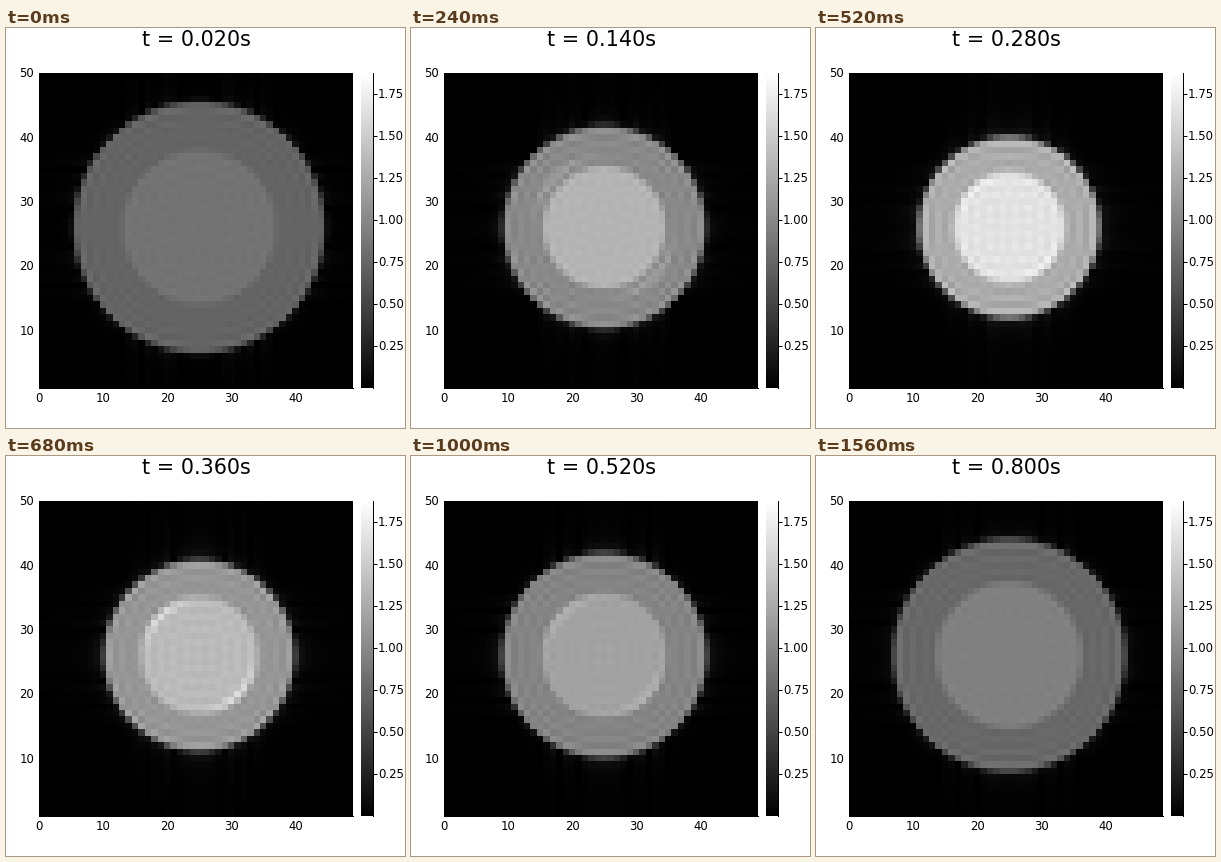
Recreate the animation shown at these times as a matplotlib script. Size 399x400 px, loop 1.6 s.

```python
import numpy as np
import matplotlib.pyplot as plt
from matplotlib.animation import FuncAnimation

W, H, DPI = 399, 400, 64
FRAMES, INTERVAL = 40, 40
N = 50
VMAX = 1.875

# Heart cycle: time, outer radius, inner radius, cavity and wall gray level
CYCLE = np.array([
    (0.02, 19.6, 11.9, 115, 100),
    (0.08, 17.5, 10.6, 143, 115),
    (0.14, 15.8, 9.5, 180, 137),
    (0.22, 14.1, 8.45, 247, 185),
    (0.26, 14.0, 8.5, 236, 177),
    (0.36, 14.9, 9.2, 186, 150),
    (0.52, 16.0, 9.7, 162, 132),
    (0.66, 17.0, 10.4, 143, 120),
    (0.80, 18.2, 11.3, 128, 104),
])

# Bessel J1 from its integral form
tau = (np.arange(256) + 0.5) * np.pi / 256
bx = np.linspace(0, 100, 4001)
j1 = np.cos(tau - bx[:, None] * np.sin(tau)).mean(axis=1)

freq = np.fft.fftfreq(N)
K = np.maximum(np.hypot(freq[:, None], freq[None, :]), 1e-9)

yy, xx = np.mgrid[:N, :N] - N // 2
DIST = np.hypot(xx, yy)
DIAGONAL = np.clip(-2 * xx * yy / np.maximum(DIST, 1) ** 2, 0, 1) ** 1.5


def disc(radius):
    """Fourier transform of a unit disc on the sampled grid."""
    spectrum = radius * np.interp(2 * np.pi * radius * K, bx, j1) / K
    spectrum[0, 0] = np.pi * radius ** 2
    return spectrum


def phantom(t):
    outer, inner, cavity, wall = (
        np.interp(t, CYCLE[:, 0], CYCLE[:, i]) for i in range(1, 5))
    spectrum = wall * disc(outer) + (cavity - wall) * disc(inner)
    img = np.abs(np.fft.fftshift(np.fft.ifft2(spectrum)))
    # motion leaves a bright rim along one diagonal
    contracting = np.interp(t, [0.04, 0.14, 0.21], [0, 24, 0])
    relaxing = np.interp(t, [0.25, 0.36, 0.52, 0.66, 0.8], [0, 32, 16, 5, 0])
    for gain, shift in ((contracting, 1.4), (relaxing, -0.6)):
        rim = np.exp(-((DIST - inner - shift) / 0.65) ** 2)
        img += gain * rim * DIAGONAL
    return img * VMAX / 255


def pixel_axes(x0, y0, x1, y1):
    return fig.add_axes([x0 / W, 1 - y1 / H, (x1 - x0) / W, (y1 - y0) / H])


def label(x, y, text, px, ha):
    return fig.text(x / W, 1 - y / H, text, fontsize=px * 72 / DPI,
                    ha=ha, va="baseline", color="black")


plt.rcParams["font.family"] = "DejaVu Sans"
fig = plt.figure(figsize=(W / DPI, H / DPI), dpi=DPI, facecolor="white")
LINE = 72 / DPI

ax = pixel_axes(33, 45, 347, 360)
image = ax.imshow(phantom(0.02), cmap="gray", vmin=0, vmax=VMAX,
                  origin="lower", interpolation="nearest", aspect="auto",
                  extent=(-0.5, N - 0.5, 0.5, N + 0.5))
ax.set(xlim=(0, 49), ylim=(1, 50), xticks=[], yticks=[])

bar = pixel_axes(355, 45, 367, 360)
bar.imshow(np.linspace(0, 1, 256)[:, None], cmap="gray", origin="lower",
           interpolation="nearest", aspect="auto", extent=(0, 1, 0, VMAX))
bar.set(xlim=(0, 1), ylim=(0, VMAX), xticks=[])
ticks = np.arange(0.25, 1.8, 0.25)
bar.yaxis.tick_right()
bar.set_yticks(ticks, labels=[])
bar.tick_params(axis="y", length=4 * LINE, width=LINE)

for axes, shown in ((ax, ("left", "bottom")), (bar, ("right",))):
    for side, spine in axes.spines.items():
        spine.set_visible(side in shown)
        spine.set_linewidth(LINE)

for v in range(0, 50, 10):
    label(33.3 + v * 314 / 49, 374.3, str(v), 11.6, "center")
for v in range(10, 60, 10):
    label(28.3, 360 - (v - 1) * 315 / 49 + 4.4, str(v), 11.6, "right")
for v in ticks:
    label(371.8, 360 - v * 315 / VMAX + 4.4, f"{v:.2f}", 11.6, "left")
title = label(190.3, 18.2, "", 20.7, "center")


def draw(i):
    t = 0.02 * (i + 1)
    image.set_data(phantom(t))
    title.set_text(f"t = {t:.3f}s")
    return image, title


anim = FuncAnimation(fig, draw, frames=FRAMES, interval=INTERVAL,
                     repeat=True, repeat_delay=0)
plt.show()
```
